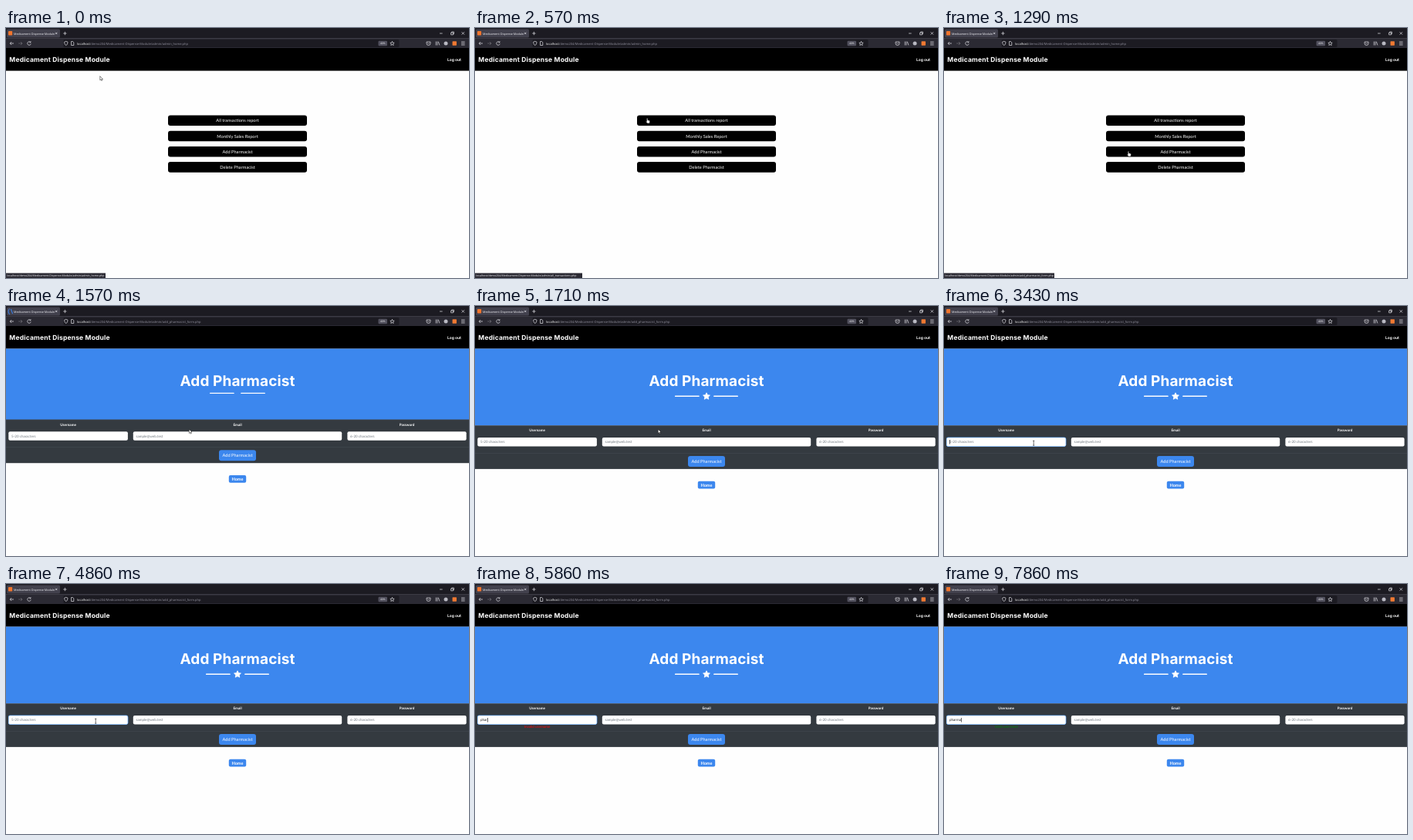
An HTML page for the animation above (8000 ms loop, 600 by 325 pixels).

```html
<!DOCTYPE html>
<html lang="en">
<head>
<meta charset="utf-8">
<title>Add pharmacist</title>
<style>
  html, body { margin: 0; width: 100%; height: 100%; overflow: hidden; background: #fefefe; }
  svg { display: block; width: 100vw; height: 100vh; }
  text { text-rendering: geometricPrecision; }
  .ui { font-family: "Open Sans", "Noto Sans", sans-serif; }
  .body { font-family: Lato, sans-serif; }
  .brand { font-family: Inter, sans-serif; font-weight: 700; fill: #fff; }
  .mid { text-anchor: middle; }
  .line { fill: none; stroke: #e4e4ea; stroke-width: .7; }
</style>
</head>
<body>
<svg id="stage" viewBox="0 0 600 325" preserveAspectRatio="none"></svg>
<script>
const LOOP = 8000;
const APP = 'Medicament Dispense Module';
const PATH = '/demo204/' + APP.replaceAll(' ', '-') + '/admin/';
const BLUE = '#3c87ee', DARK = '#343a40';

const rect = (x, y, w, h, fill, r = 0, extra = '') =>
  `<rect x="${x}" y="${y}" width="${w}" height="${h}" rx="${r}" fill="${fill}" ${extra}/>`;
const text = (x, y, size, fill, str, cls = 'body', extra = '') =>
  `<text x="${x}" y="${y}" font-size="${size}" fill="${fill}" class="${cls}" ${extra}>${str}</text>`;
const line = (d, extra = '') => `<path class="line" d="${d}" ${extra}/>`;
const group = (id, inner) => `<g id="${id}">${inner}</g>`;

function star(cx, cy, outer, inner) {
  const points = Array.from({ length: 10 }, (_, i) => {
    const r = i % 2 ? inner : outer, a = i * Math.PI / 5 - Math.PI / 2;
    return `${(cx + r * Math.cos(a)).toFixed(2)},${(cy + r * Math.sin(a)).toFixed(2)}`;
  });
  return points.join(' ');
}

function browser() {
  return rect(0, 0, 600, 13.5, '#1c1b22')
    + rect(0, 13.2, 600, 13, '#2b2a33')
    + rect(1, 1.5, 69, 11, '#42414d', 1.5)
    + group('favicon', rect(3, 4, 5.2, 5.6, '#f0752d', .8))
    + group('spinner', line('M4.6 3.5Q1.5 7 4.6 11M6.4 4L8.6 10', 'style="stroke:#3d7fe0;stroke-width:1.1"'))
    + text(10, 8.6, 3.75, '#f4f4f8', APP, 'ui')
    + line('M64 5.7l2.4 2.4m0-2.4l-2.4 2.4M74.2 7h4.4M76.4 4.8v4.4')
    + line('M562 7h3.6M576.6 6h2.8v2.8h-2.8zM577.6 6V5h2.8v2.8h-1M590.6 5.2l3.4 3.4m0-3.4l-3.4 3.4')
    + line('M10 20H5.2m2-2l-2 2 2 2')
    + line('M16.2 20H21m-2-2l2 2-2 2', 'opacity=".35"')
    + line('M31.8 18.5a2.3 2.3 0 1 0 .5 2M32 17.2v1.6h-1.6')
    + rect(74.5, 15, 435, 10, '#1c1b22', 1.5)
    + line('M77.8 17.3l2.1.8c0 2.4-.7 3.7-2.1 4.5-1.4-.8-2.1-2.1-2.1-4.5z')
    + line('M84.6 17.5h2l1.2 1.2v3.8h-3.2z')
    + `<text id="url" class="ui" x="92" y="21.5" font-size="4.05" fill="#93929f"></text>`
    + rect(482.5, 16.8, 11.5, 6.4, '#52515e', 1.2)
    + text(488.2, 21.3, 3.3, '#fff', '40%', 'ui mid')
    + `<polygon class="line" points="${star(500.5, 20.2, 2.8, 1.3)}"/>`
    + line('M545 18h5v2a2.5 2.5 0 0 1-5 0zM546.3 19.5l1.2 1.1 1.2-1.1')
    + line('M557.2 17.5v5M559 17.5v5M560.3 17.7l1.6 4.7')
    + '<circle cx="570" cy="20" r="2.5" fill="#b9b9c2"/>'
    + rect(578.5, 17.3, 5.4, 5.4, '#f07a32', .6)
    + line('M590 18h4.6M590 20h4.6M590 22h4.6');
}

function siteHeader() {
  return rect(0, 26, 600, 29.6, '#000')
    + text(4.3, 44, 8.5, '#fff', APP, 'brand', 'letter-spacing=".18"')
    + text(581, 43, 4.9, '#fff', 'Log out', 'brand mid');
}

function homePage() {
  const labels = ['All transactions report', 'Monthly Sales Report', 'Add Pharmacist', 'Delete Pharmacist'];
  return labels.map((label, i) => {
    const y = 113.5 + i * 20.2;
    return rect(210, y, 180, 13.6, '#000', 3) + text(300, y + 8.8, 5.7, '#fff', label, 'body mid');
  }).join('');
}

function field(x, w, label, hint, id) {
  return text(x + w / 2, 163.4, 4.6, '#fff', label, 'body mid', 'font-weight="700"')
    + rect(x, 171, w, 11.4, '#fff', 2, `id="${id}Box"`)
    + text(x + 3.7, 178.4, 4.55, '#6c757d', hint, 'body', `id="${id}Hint"`);
}

function formPage() {
  return rect(0, 55.5, 600, 100, BLUE, 0, 'id="banner"')
    + text(300, 103.6, 19, '#fff', 'Add Pharmacist', 'brand mid', 'letter-spacing=".1"')
    + group('rules', rect(259, 116.4, 31.7, 1.6, '#fff', .5) + rect(309.2, 116.4, 31.7, 1.6, '#fff', .5)
      + `<polygon points="${star(300, 117.5, 4.7, 2.3)}" fill="#fff" stroke="#fff" stroke-width=".8" stroke-linejoin="round"/>`)
    + group('earlyRules', rect(264, 112.7, 31.7, 1.4, '#fff', .5) + rect(304.2, 112.7, 31.7, 1.4, '#fff', .5))
    + group('form', rect(0, 155.4, 600, 56.5, DARK)
      + rect(0, 155.4, 600, .5, '#454d55') + rect(0, 191, 600, .5, '#454d55')
      + field(3.3, 154.6, 'Username', '5-20 characters', 'user')
      + field(164.8, 270.4, 'Email', 'sample@web.test', 'mail')
      + field(442.4, 154.2, 'Password', '6-20 characters', 'pass')
      + text(7, 178.4, 4.55, '#222', '', 'body', 'id="typed"')
      + rect(7, 174, .6, 5.6, '#000', 0, 'id="caret"')
      + text(80.6, 187.2, 4.55, 'red', '', 'body mid', 'id="message"')
      + rect(276, 195, 48, 14, BLUE, 3) + text(300, 203.9, 5.7, '#fff', 'Add Pharmacist', 'body mid')
      + rect(288.8, 227.8, 22.4, 9.6, BLUE, 2)
      + text(300, 234.7, 5.6, '#fff', 'Home', 'body mid', 'font-weight="700"'));
}

const statusBar = group('status', rect(0, 318.6, 0, 6.4, '#2b2a33', 0, 'id="statusBox"')
  + text(1.3, 323.1, 3.55, '#f4f4f8', '', 'ui', 'id="statusText"'));

const pointers = group('arrow', '<path d="M0 0v5.2l1.2-1 .8 1.7.9-.4-.8-1.7h1.6z" fill="#fff" stroke="#111" stroke-width=".5"/>')
  + group('hand', '<path d="M1 .3q.8-.3.8.6v1.8l2.2.6q.7.3.6 1l-.5 2.6h-2.7L-.5 4.8q0-.7.8-.4l.2.2V.9z" fill="#fff" stroke="#111" stroke-width=".5"/>')
  + group('beam', '<path d="M-1.1-3h2.2M0-3v6M-1.1 3h2.2" fill="none" stroke="#111" stroke-width=".6"/>');

document.getElementById('stage').innerHTML = rect(0, 0, 600, 325, '#fefefe') + browser() + siteHeader()
  + group('home', homePage()) + group('add', formPage()) + statusBar + pointers;

const $ = id => document.getElementById(id);
const show = (id, on) => $(id).setAttribute('display', on ? 'inline' : 'none');
const write = (id, str) => { if ($(id).textContent !== str) $(id).textContent = str; };

// Each row: start time in ms, then the values held until the next row.
const POINTER = [
  [0, 'arrow', 121.8, 62.6], [140, 'arrow', 127, 69], [290, 'arrow', 150, 86], [430, 'arrow', 188, 104],
  [570, 'hand', 222, 117], [710, 'arrow', 238, 128], [860, 'hand', 243, 136], [1000, 'hand', 243, 142],
  [1140, 'arrow', 241, 149], [1290, 'hand', 237.8, 160], [1570, 'arrow', 237.3, 160.2],
  [1860, 'arrow', 231, 163], [2000, 'arrow', 206, 169], [2140, 'arrow', 170, 173],
  [2290, 'beam', 140, 175], [2430, 'beam', 125, 175], [2570, 'beam', 119, 176],
  [2710, 'beam', 116.2, 178.2], [5430, 'none', 0, 0]
];
const STATUS = [
  [0, 'admin_home.php', 129], [430, '', 0], [570, 'all_transactions.php', 139],
  [860, 'monthly_sales.php', 134], [1290, 'add_pharmacist_form.php', 143], [1570, '', 0]
];
const TYPED = [
  [0, ''], [5430, 'p'], [5570, 'ph'], [5710, 'pha'], [5860, 'phar'], [6000, 'pharm'],
  [6140, 'pharma'], [6430, 'pharmac'], [7860, 'pharma']
];
const MESSAGE = [
  [0, '', 'red'], [5430, 'Invalid username', 'red'], [6000, 'Valid username', 'green'],
  [6570, 'Username is already registered', 'red'], [7860, 'Valid username', 'green']
];
const CARET = [
  [0, false], [3140, true], [3710, false], [4290, true], [4860, false],
  [5430, true], [7000, false], [7570, true]
];
const at = (table, t) => table.findLast(row => row[0] <= t).slice(1);

function render(t) {
  const onForm = t >= 1570, loading = onForm && t < 1710, focused = t >= 3140;

  show('home', !onForm);
  show('add', onForm);
  show('favicon', !loading);
  show('spinner', loading);
  show('rules', !loading);
  show('earlyRules', loading);
  $('banner').setAttribute('height', loading ? 92.5 : 100);
  $('form').setAttribute('transform', `translate(0 ${loading ? -7.7 : 0})`);

  const page = onForm ? 'add_pharmacist_form.php' : 'admin_home.php';
  if ($('url').dataset.page !== page) {
    $('url').dataset.page = page;
    $('url').innerHTML = `<tspan fill="#fff">localhost</tspan>${PATH}${page}`;
  }

  const [link, width] = at(STATUS, t);
  show('status', width > 0);
  $('statusBox').setAttribute('width', width);
  write('statusText', 'localhost' + PATH + link);

  const [kind, x, y] = at(POINTER, t);
  for (const id of ['arrow', 'hand', 'beam']) show(id, id === kind);
  if (kind !== 'none') $(kind).setAttribute('transform', `translate(${x} ${y})`);

  const [typed] = at(TYPED, t);
  write('typed', typed);
  show('userHint', !typed);
  $('userBox').style.cssText = focused
    ? 'stroke:#80bdff;stroke-width:.5;filter:drop-shadow(0 0 .7px #2e8cff)' : '';
  show('caret', focused && at(CARET, t)[0]);
  $('caret').setAttribute('x', 7 + (typed ? $('typed').getComputedTextLength() : 0));

  const [message, color] = at(MESSAGE, t);
  write('message', message);
  $('message').setAttribute('fill', color);
}

const start = performance.now();
function tick() {
  render((performance.now() - start) % LOOP);
  requestAnimationFrame(tick);
}
tick();
</script>
</body>
</html>
```
